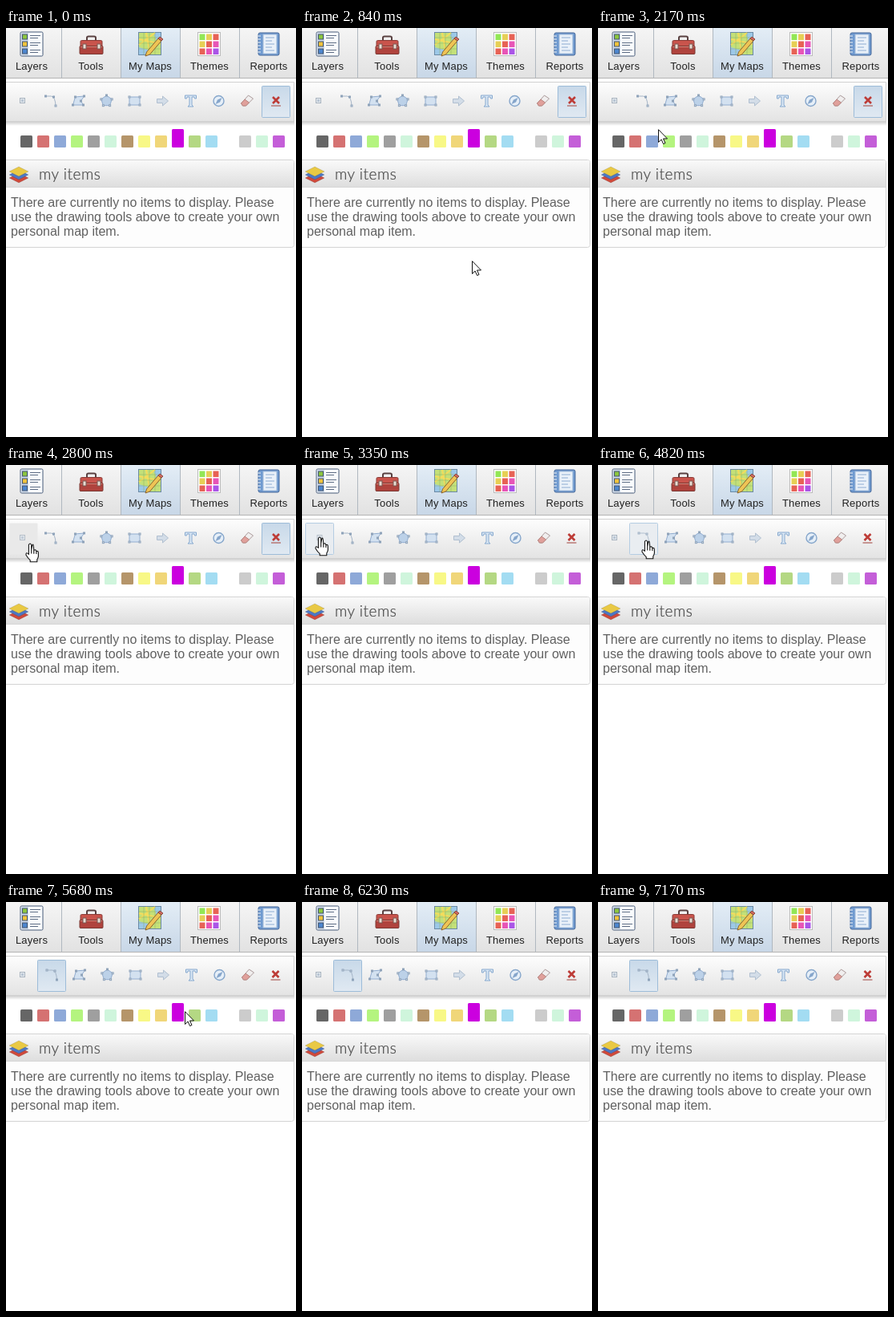
Animation of 362 by 510 pixels, one loop 8020 ms. Source, as an HTML page:

```html
<!DOCTYPE html>
<html lang="en">
<head>
<meta charset="utf-8">
<title>My Maps toolbar</title>
<style>
  html, body { margin: 0; width: 100%; height: 100%; overflow: hidden; background: #fff; }
  svg { display: block; }
  text { font-family: "Liberation Sans", Arial, sans-serif; }
  .tab { font-size: 13px; letter-spacing: .2px; fill: #222; text-anchor: middle; }
  .title { font: 300 19px Lato, "Open Sans", sans-serif; letter-spacing: .5px; fill: #444; stroke: #444; stroke-width: .2px; }
  .note { font-size: 16px; fill: #606060; }
</style>
</head>
<body>
<svg width="362" height="510" viewBox="0 0 362 510">
  <defs id="fills"></defs>
  <g id="tabs"></g>
  <rect y="116" width="360" height="6" fill="url(#shade)"/>
  <path d="M-1 67.5H359.5V116.5H-1Z" fill="url(#bar)" stroke="#d0d0d0"/>
  <g id="swatches"></g>
  <rect x="-5.5" y="164.5" width="365" height="109" rx="3" fill="#fdfdfd" stroke="#d4d4d4"/>
  <path d="M-1 165H357Q359 165 359 167V198H-1Z" fill="url(#head)"/>
  <path d="M0 198.5H359" stroke="#d6d6d6"/>
  <g id="stack"></g>
  <text class="title" x="41" y="189">my items</text>
  <g id="note"></g>
  <g id="buttons"></g>
  <g id="cursor" stroke="#111" fill="#fff">
    <path id="arrow" d="M.5 .7V16.5L4.1 13L6.6 18.6L9 17.5L6.5 12H11.5Z"/>
    <path id="hand" transform="translate(-1 -.6)" stroke-width="1.1" stroke-linejoin="round"
      d="M-1.6 14V2.2Q0-1 1.7 2.2V8.4Q4-5.5 4.8 9.2Q7 7 7.9 10.4Q10.500 9 10.400 12.500V16.500Q10 19 8.800 20.500V23.400H.2V21.300Q-2.500 18.800-5 14.800Q-5.500 10.500-1.600 14ZM1.700 8.400V13M4.800 9.200V13.300M7.900 10.400V13.600"/>
  </g>
</svg>
<script>
const LOOP = 8020, STEP = 77;
const $ = id => document.getElementById(id);
const repeat = (n, make) => Array.from({ length: n }, (_, i) => make(i)).join('');
const rect = (x, y, w, h, fill, stroke = 'none', rx = 0) =>
  `<rect x="${x}" y="${y}" width="${w}" height="${h}" fill="${fill}" stroke="${stroke}" rx="${rx}"/>`;
const path = (d, fill, stroke = 'none', width = 1) =>
  `<path d="${d}" fill="${fill}" stroke="${stroke}" stroke-width="${width}"/>`;
const line = (d, stroke, width = 1) => path(d, 'none', stroke, width);
const fade = (id, top, bottom) => `<linearGradient id="${id}" x2="0" y2="1">
  <stop stop-color="${top}"/><stop offset="1" stop-color="${bottom}"/></linearGradient>`;

$('fills').innerHTML = fade('tab', '#f5f5f5', '#e2e2e2') + fade('tabOn', '#e3edf6', '#c8d7e7') +
  fade('bar', '#fdfdfd', '#e3e3e3') + fade('head', '#f9f9f9', '#dedede') +
  fade('btnOn', '#c8d9e9', '#e0e9f2') + fade('shade', '#c6c6c6', '#fff');

// Tab pictures, each in its own 30 by 32 box
const layers = rect(1, 1, 28, 30, '#f8fafc', '#465a78', 1.5) + rect(2, 2, 9, 28, '#cfdced') +
  repeat(3, i => {
    const y = 4 + i * 9;
    return rect(3.5, y, 6, 6, ['#8cc63f', '#f0c33c', '#4d86cf'][i], '#40536c') +
      line(`M13 ${y + 1.5}H26M13 ${y + 4.5}H23`, '#5d6c84');
  });
const toolbox = line('M10 12V8Q10 6.500 12 6.500H19Q21 6.500 21 8V12', '#5a4242', 2) +
  rect(2, 11.5, 27, 8, '#c9544c', '#8a3a35', 1.5) + rect(1, 18.5, 29, 10, '#b0433d', '#7a3833', 1) +
  line('M2 19.500H29', '#de857a') + repeat(2, i => rect(5 + i * 18, 16, 4, 6, '#e8dcd2', '#7a5853'));
const map = rect(.5, 1.5, 28, 28, '#c3e079', '#6b8aa5') +
  path('M19 2H28V13H23ZM1 20L12 23L14 29H1Z', '#9cc8e8') +
  line('M1 10L28 16M10 2L15 29M1 17L21 2', '#f4dc5c', 2) +
  repeat(3, i => line(`M${7 + i * 7} 2V29M1 ${8 + i * 7}H28`, '#8aad66', .5)) +
  path('M9 31L10.500 26L25 9L29 12L14.500 29Z', '#efc455', '#8a6530') +
  path('M25 9L27 7L31 10L29 12Z', '#d66a60', '#8b4b42');
const themes = rect(.5, 1.5, 28, 29, '#fff', '#bbb') + repeat(9, i => {
  const col = i % 3, row = (i - col) / 3;
  return rect(2.5 + col * 8.5, 3.5 + row * 9, 7, 7.5, `hsl(${95 - 45 * (row + col)} 75% 62%)`);
});
const report = rect(2, 2, 26, 28, '#6f9ad0', '#46699a', 2) + rect(8, 4, 17, 24, '#eaf1f9', '#9db8d8') +
  repeat(5, i => line(`M11 ${8 + i * 4}H${22 - i % 2 * 3}`, '#8eacd2')) +
  repeat(6, i => line(`M.5 ${6 + i * 4}H5`, '#cddaea', 1.4));

const tabs = { Layers: layers, Tools: toolbox, 'My Maps': map, Themes: themes, Reports: report };
$('tabs').innerHTML = Object.entries(tabs).map(([name, picture], i) => {
  const x = i * 74 - 5;
  return rect(x, 0, 74, 62, `url(#${i === 2 ? 'tabOn' : 'tab'})`) + line(`M${x + .5} 0V62`, '#b0b8c0') +
    `<g transform="translate(${x + 22} 4)">${picture}</g><text class="tab" x="${x + 37}" y="52">${name}</text>`;
}).join('') + line('M0 62.500H362', '#b4b4b4');

const palette = `#666 #d57272 #8ea9d8 #b4f47f #9f9f9f #cff5dc #b5956a #f8f886
  #f0d679 #cb00df #b4d883 #a3dcf2 none #ccc #cff5dc #c45ed8`.split(/\s+/);
$('swatches').innerHTML = palette.map((colour, i) => {
  const top = i === 9 ? 126 : 134;
  return rect(18 + 21 * i, top, 15, 149 - top, colour, 'none', 1.5);
}).join('');

$('stack').innerHTML = ['#cf4a3c', '#4d78c4', '#e9c944'].map((colour, i) =>
  path(`M4 ${187 - 4 * i}l12-6l12 6l-12 6Z`, colour, '#0003', .6)).join('');
$('note').innerHTML = [
  'There are currently no items to display. Please',
  'use the drawing tools above to create your own',
  'personal map item.'
].map((words, i) => `<text class="note" x="6" y="${223 + 18 * i}">${words}</text>`).join('');

// Toolbar icons, centred on 0,0
const blue = '#92add0', pale = '#d3e1f0';
const shape = (points, fill = pale) => path(`M${points.join('L')}Z`, fill, blue) +
  points.map(([x, y]) => rect(x - 1, y - 1, 2, 2, '#dfe7ef', '#8fa3ba')).join('');
const ring = n => Array.from({ length: n }, (_, i) => {
  const a = i / n * 2 * Math.PI;
  return [7 * Math.sin(a), -7 * Math.cos(a)];
});
const icons = [
  rect(-3, -3.5, 6, 6, '#e4e9ee', '#a9b4c0') + rect(-1.5, -2, 3, 3, '#b9c6d4'),
  line('M-6 -6H1Q6 -5 6.500 6', '#a5b5c7') + shape([[-6, -6]]) + shape([[4, -5]]) + shape([[6.5, 6]]),
  shape([[-4, -5], [7, -6], [3, 0], [6, 5], [-7, 5]]),
  shape(ring(5), '#bcd1e8'),
  shape([[-6.5, -5], [6.5, -5], [6.5, 5], [-6.5, 5]]),
  path('M-7 -2.500H0V-6L7 0L0 6V2.500H-7Z', '#d3dde8', '#b0bfd0'),
  path('M-7 -7H7V-3H5L4.500 -5H1.500V5L3.500 7H-3.500L-1.500 5V-5H-4.500L-5 -3H-7Z', '#dbe8f5', '#86a8ce'),
  '<circle r="6.500" fill="#e6eff8" stroke="#86a6cb" stroke-width="1.400"/>' +
    path('M4 -4L1.500 1.500L-4 4L-1.500 -1.500Z', '#86a6cb'),
  path('M-7 3L2 -7L8 -3L-1 6H-5Z', '#f0eeee', '#a99') + path('M-7 3L-2.500 -2L3 2L-1 6H-5Z', '#e0a09b', '#b98580'),
  line('M-4 -5L4 3M4 -5L-4 3', '#bd3c37', 2.6) + line('M-6 6H6', '#b5706c', 1.4)
];
$('buttons').innerHTML = icons.map(icon =>
  `<g>${rect(.5, 72.5, 35, 39, 'none', 'none', 1)}<g>${icon}</g></g>`).join('');
const buttons = [...$('buttons').children];

// Pointer glides: start time, number of steps, then start, optional bend and end
const glides = [
  [140, 2, [339, 513], [321, 473]],
  [530, 5, [321, 473], [212, 290]],
  [1620, 2, [212, 290], [226, 299]],
  [1850, 5, [226, 299], [75, 126]],
  [2250, 6, [75, 126], [50, 41], [54, 135]],
  [2720, 4, [54, 135], [23, 83], [23, 90]],
  [4190, 2, [23, 90], [78, 95]],
  [4430, 3, [78, 95], [61, 94]],
  [5060, 9, [61, 94], [235, 194], [223, 136]],
  [5840, 3, [223, 136], [215, 136]],
  [6150, 1, [215, 136], [247, 148]],
  [6230],
  [6930, 3, [234, 257], [273, 476]],
  [7170]
];
const clicks = [
  { press: 0, select: 0, tool: 9 },
  { press: 3110, select: 3350, tool: 0 },
  { press: 4740, select: 4820, tool: 1 }
];

function pointerAt(t) {
  const glide = glides.findLast(([start]) => start <= t);
  if (!glide || glide.length === 1) return null;
  const [start, steps, from, ...rest] = glide;
  const u = Math.min(steps, Math.floor((t - start) / STEP) + 1) / steps;
  const to = rest.at(-1);
  return from.map((a, k) => {
    const bend = rest.length > 1 ? rest[0][k] : (a + to[k]) / 2;
    return Math.round((1 - u) ** 2 * a + 2 * u * (1 - u) * bend + u * u * to[k]);
  });
}

const inside = (tip, x, y, w, h) =>
  tip !== null && tip[0] >= x && tip[0] < x + w && tip[1] >= y && tip[1] < y + h;

// Returns whether the pointer is over any button
function drawButtons(t, tip) {
  const selected = clicks.findLast(c => c.select <= t).tool;
  const pressed = clicks.findLast(c => c.press <= t).tool;
  let left = 4, hovering = false;
  buttons.forEach((button, i) => {
    const on = i === selected, width = on ? 36 : 35;
    const over = inside(tip, left, 72, width, 40);
    const [back, icon] = button.children;
    button.setAttribute('transform', `translate(${left} 0)`);
    back.setAttribute('fill', on ? (over ? '#e9edf1' : 'url(#btnOn)') : over ? '#e9e9e9' : 'none');
    back.setAttribute('stroke', on ? (over ? '#b5cde3' : '#9dbcd9') : 'none');
    icon.setAttribute('transform', `translate(${on || i === pressed ? 18 : 16.5} 91)`);
    icon.setAttribute('opacity', over ? .8 : 1);
    hovering ||= over;
    left += width;
  });
  return hovering;
}

function draw(t) {
  const tip = pointerAt(t);
  const overButton = drawButtons(t, tip);
  const pointing = overButton || inside(tip, 207, 126, 15, 23);
  $('cursor').style.display = tip ? '' : 'none';
  $('cursor').setAttribute('transform', `translate(${tip || [0, 0]})`);
  $('arrow').style.display = pointing ? 'none' : '';
  $('hand').style.display = pointing ? '' : 'none';
}

const start = performance.now();
function tick() {
  draw((performance.now() - start) % LOOP);
  requestAnimationFrame(tick);
}
tick();
</script>
</body>
</html>
```
